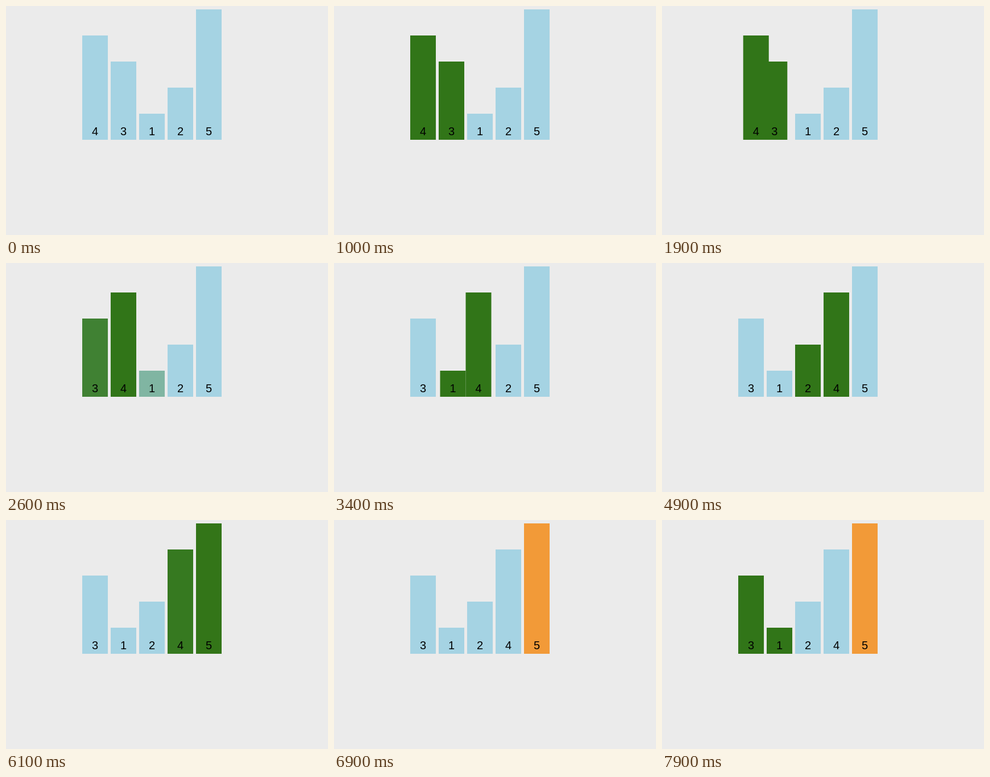
Recreate the animation shown at these times as an HTML page. Size 566 by 404 pixels, loop 8000 ms.

```html
<!DOCTYPE html>
<html lang="en">
<head>
<meta charset="utf-8">
<title>Bubble sort</title>
<style>
  html, body { margin: 0; width: 100%; height: 100%; overflow: hidden; background: #ebebeb; }
  svg { display: block; width: 566px; height: 404px; }
  text { font: 20px "Liberation Sans", Arial, sans-serif; text-anchor: middle; }
</style>
</head>
<body>
<svg id="stage" viewBox="0 0 566 404"></svg>
<script>
const LOOP = 8000, TICK = 100, FADE = 250;
const LEFT = 134, STEP = 50, WIDTH = 45, BASE = 236, UNIT = 46;
const BLUE = [165, 211, 227], GREEN = [49, 117, 24], ORANGE = [242, 154, 56];
const START = [4, 3, 1, 2, 5];

// [start ms, bar value, new colour]
const fades = [
  [435, 4, GREEN], [435, 3, GREEN],
  [2492, 1, GREEN], [2520, 3, BLUE],
  [3862, 2, GREEN], [3890, 1, BLUE],
  [5315, 5, GREEN], [5340, 2, BLUE],
  [6046, 4, BLUE], [6065, 5, ORANGE],
  [7445, 3, GREEN], [7445, 1, GREEN]
];
// [start ms, bar value, new slot]
const moves = [
  [1812, 4, 1], [1812, 3, 0],
  [3208, 4, 2], [3208, 1, 1],
  [4625, 4, 3], [4625, 2, 2]
];

const ease = p => p < 0.5 ? 4 * p ** 3 : 1 - 4 * (1 - p) ** 3;
const progress = (t, start) => ease(Math.min(1, Math.max(0, (t - start) / FADE)));
const mix = (a, b, p) => a + (b - a) * p;

function add(parent, tag, attrs) {
  const el = document.createElementNS("http://www.w3.org/2000/svg", tag);
  for (const name in attrs) el.setAttribute(name, attrs[name]);
  return parent.appendChild(el);
}

const stage = document.getElementById("stage");
const bars = START.map((value, slot) => {
  const group = add(stage, "g", {});
  const height = value * UNIT;
  const rect = add(group, "rect", { y: BASE - height, width: WIDTH, height });
  add(group, "text", { x: WIDTH / 2, y: 228 }).textContent = value;
  return { value, slot, group, rect };
});

function draw(time) {
  const t = Math.floor((time % LOOP) / TICK) * TICK;
  for (const { value, slot, group, rect } of bars) {
    let place = slot, color = BLUE;
    for (const [start, bar, to] of moves)
      if (bar === value) place = mix(place, to, progress(t, start));
    for (const [start, bar, to] of fades)
      if (bar === value) color = color.map((c, i) => mix(c, to[i], progress(t, start)));
    group.setAttribute("transform", `translate(${LEFT + place * STEP} 0)`);
    rect.setAttribute("fill", `rgb(${color.map(Math.round)})`);
  }
}

const origin = performance.now();
function loop() {
  draw(performance.now() - origin);
  requestAnimationFrame(loop);
}
loop();
</script>
</body>
</html>
```
